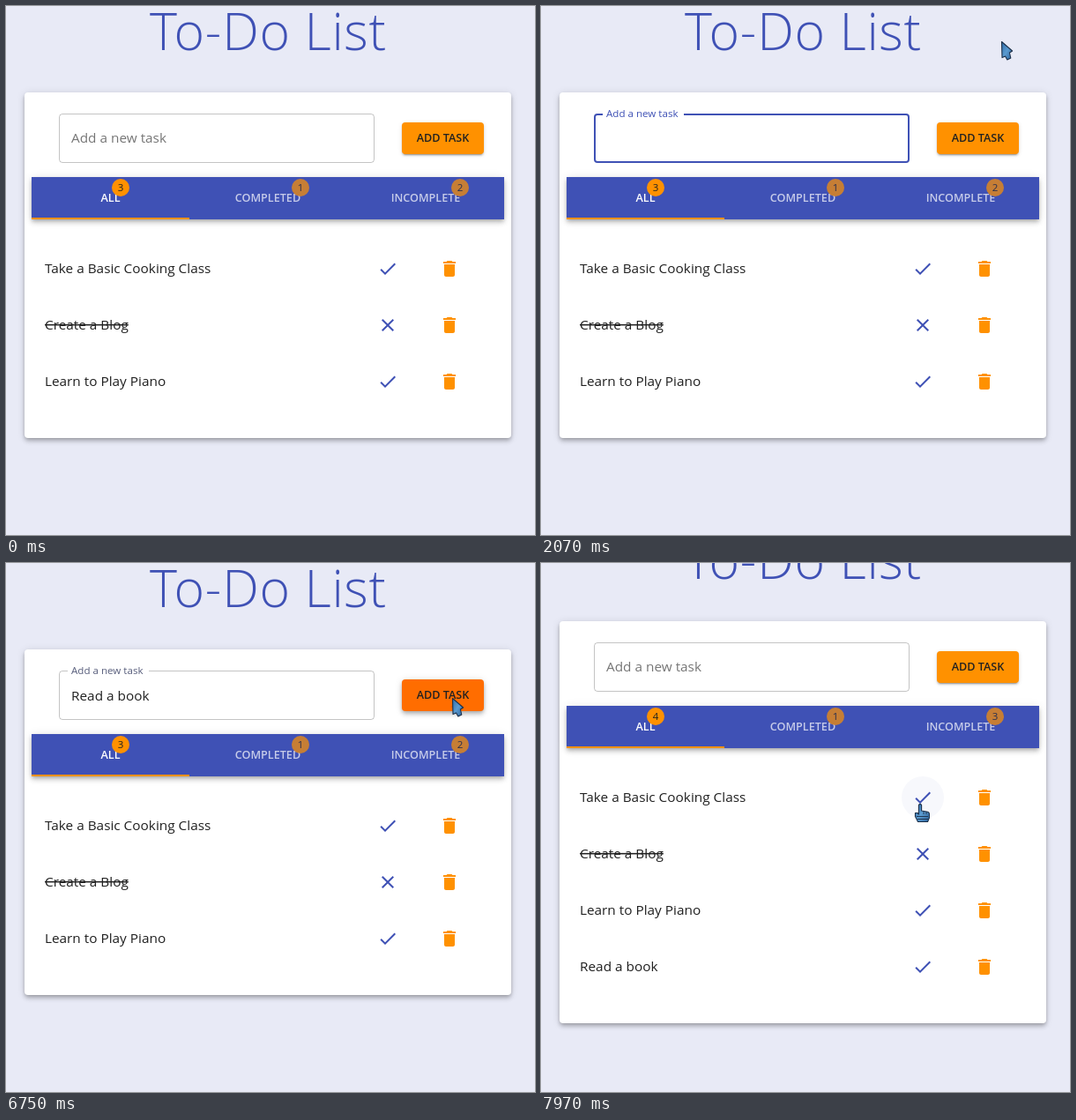
Animation of 600x600 px, one loop 8 s. Source, as an HTML page:

```html
<!DOCTYPE html>
<html lang="en">
<head>
<meta charset="utf-8">
<title>To-Do List</title>
<style>
  html, body { margin: 0; width: 100%; height: 100%; overflow: hidden; background: #e8eaf6; }
  #app { position: absolute; left: 0; top: 0; width: 600px; height: 600px; }
  #app div { position: absolute; box-sizing: border-box; border-radius: 4px; }
  svg { position: absolute; left: 0; top: 0; width: 600px; height: 600px; overflow: visible; }
  text { font: 15.35px "Open Sans", "Noto Sans", sans-serif; fill: #212121; white-space: pre; }
  #card { left: 21px; top: 98px; width: 552px; background: #fff;
    box-shadow: 0 2px 4px -1px #0003, 0 4px 5px #00000024, 0 1px 10px #0000001f; }
  #field { left: 60px; top: 122px; width: 358px; height: 56px; }
  #app #notch { left: 70px; top: 121px; height: 4px; background: #fff; border-radius: 0; }
  #button { left: 449px; top: 132px; width: 93px; height: 36px; }
  #app #bar { left: 29px; top: 194px; width: 536px; height: 48px; background: #3f51b5; border-radius: 0;
    box-shadow: 0 2px 4px -1px #0003, 0 4px 5px #00000024, 0 1px 10px #0000001f; }
  .title { font-size: 59px; font-weight: 300; letter-spacing: .6px; fill: #3f51b5; }
  .caps { font-size: 12.6px; font-weight: 600; text-anchor: middle; }
  .tab .caps { fill: #fff; }
  .tab .count { font-size: 11.5px; text-anchor: middle; }
  .done { text-decoration: line-through; }
</style>
</head>
<body>
<div id="app">
  <div id="card"></div>
  <div id="field"></div>
  <div id="notch"></div>
  <div id="button"></div>
  <div id="bar"></div>
  <svg>
    <defs><clipPath id="buttonClip"><rect x="449" y="132" width="93" height="36" rx="4"/></clipPath></defs>
    <text class="title" x="163" y="50">To-Do List</text>
    <text id="label">Add a new task</text>
    <text id="value" x="74" y="156"></text>
    <rect id="caret" y="141" width="1" height="19" fill="#212121"/>
    <circle id="ripple" cx="506" cy="163" clip-path="url(#buttonClip)"/>
    <text class="caps" x="495.5" y="154">ADD TASK</text>
    <rect x="29" y="240" width="179" height="2" fill="#ff9100"/>
    <g id="tabs"></g>
    <circle id="halo" cx="433" cy="298" r="24" fill="#3f51b5"/>
    <g id="rows"></g>
  </svg>
</div>
<svg>
  <defs>
    <linearGradient id="blue" x2="1" y2="1">
      <stop stop-color="#2f6ca8"/><stop offset=".5" stop-color="#5b9bd0"/><stop offset="1" stop-color="#2a5f98"/>
    </linearGradient>
  </defs>
  <g id="cursor" fill="url(#blue)" stroke="#1b2f49" stroke-width="1.1" stroke-linejoin="round">
    <path id="arrow" d="M.5.5L12.6 11 9.4 13 10.8 19 6.8 21 4.6 17 1 18.6Z"/>
    <path id="beam" d="M-3-8.5H3V-6H1.6V6H3V8.5H-3V6H-1.6V-6H-3Z"/>
    <g id="hand">
      <path d="M-1.6 1.5Q0-.8 1.6 1.5V8L8.5 9.2Q10.6 9.8 10.4 12V16L8.6 20.5H-2.5L-5.5 14.5V10.5H-3L-1.6 12Z"/>
      <path d="M-4 14.5H9M-3 17.5H9M4 8.5V12M7 9V12" fill="none" stroke-width=".9"/>
    </g>
  </g>
</svg>
<script>
const LOOP = 8000, FOCUS = 1560, PRESS = 6700, ADD = 6760;
const TASK = 'Read a book';
const KEY_TIMES = [3050, 3260, 3460, 3620, 3830, 4110, 4320, 4520, 4690, 4910, 5150];

// time, x, y of the pointer's hot spot
const POINTER = [
  [60, 507, 565], [200, 475, 502], [480, 342, 295], [720, 247, 149], [760, 247, 149],
  [850, 240, 138], [910, 235, 132], [1120, 235, 132], [1300, 240, 148], [1620, 240, 148],
  [1740, 365, 122], [1860, 470, 73], [1950, 470, 73], [2060, 522, 40], [5910, 522, 40],
  [6150, 540, 75], [6400, 520, 125], [6600, 506, 153], [7060, 506, 153],
  [7440, 466, 206], [7530, 466, 206], [7740, 440, 255], [7900, 430, 273]
];

const CHECK = 'M9 16.17L4.83 12l-1.42 1.41L9 19 21 7l-1.41-1.41z';
const CLOSE = 'M19 6.41L17.59 5 12 10.59 6.41 5 5 6.41 10.59 12 5 17.59 6.41 19 12 13.41 17.59 19 19 17.59 13.41 12z';
const TRASH = 'M6 19c0 1.1.9 2 2 2h8c1.1 0 2-.9 2-2V7H6v12zM19 4h-3.5l-1-1h-5l-1 1H5v2h14V4z';

const $ = id => document.getElementById(id);
const clamp = v => Math.max(0, Math.min(1, v));
const mix = (a, b, p) => a + (b - a) * p;
const show = (id, on) => $(id).style.display = on ? '' : 'none';
const set = (id, attrs) => Object.entries(attrs).forEach(([k, v]) => $(id).setAttribute(k, v));

function bezier(x1, y1, x2, y2) {
  const at = (a, b, s) => 3 * a * s * (1 - s) ** 2 + 3 * b * s * s * (1 - s) + s ** 3;
  return x => {
    let low = 0, high = 1;
    for (let i = 0; i < 20; i++) {
      const mid = (low + high) / 2;
      if (at(x1, x2, mid) < x) low = mid; else high = mid;
    }
    return at(y1, y2, low);
  };
}
const standard = bezier(.4, 0, .2, 1), decelerate = bezier(0, 0, .2, 1);
const ramp = (t, start, length, ease = standard) => ease(clamp((t - start) / length));

function pointerAt(t) {
  const next = POINTER.findIndex(p => p[0] > t);
  if (next < 0) return POINTER.at(-1).slice(1);
  const [t0, x0, y0] = POINTER[Math.max(0, next - 1)], [t1, x1, y1] = POINTER[next];
  const p = clamp((t - t0) / (t1 - t0 || 1));
  return [mix(x0, x1, p), mix(y0, y1, p)];
}

$('tabs').innerHTML = [['ALL', 118.5, 130], ['COMPLETED', 297, 334], ['INCOMPLETE', 476, 515]]
  .map(([name, x, badge], i) => `<g class="tab" opacity="${i ? .7 : 1}">
    <text class="caps" x="${x}" y="222">${name}</text>
    <circle cx="${badge}" cy="206" r="10" fill="#ff9100"/>
    <text class="count" x="${badge}" y="210"></text></g>`).join('');
const counts = document.querySelectorAll('.count');

$('rows').innerHTML = ['Take a Basic Cooking Class', 'Create a Blog', 'Learn to Play Piano', TASK]
  .map((name, i) => `<g id="row${i}" transform="translate(0 ${286 + 64 * i})">
    <text class="${i === 1 ? 'done' : ''}" x="44" y="17">${name}</text>
    <path d="${i === 1 ? CLOSE : CHECK}" transform="translate(421)" fill="#3f51b5"/>
    <path d="${TRASH}" transform="translate(491)" fill="#ff9100"/></g>`).join('');

function drawField(t, hovered) {
  const focused = t >= FOCUS && t < PRESS;
  $('field').style.border = focused ? '2px solid #3f51b5' : `1px solid rgba(0,0,0,${hovered ? .87 : .23})`;

  const shrink = ramp(t, FOCUS, 200, decelerate) - ramp(t, ADD, 200, decelerate);
  const tint = ramp(t, FOCUS, 200, decelerate) - ramp(t, PRESS, 200, decelerate);
  $('notch').style.width = 92 * shrink + 'px';
  set('label', { transform: `translate(74 ${mix(155, 126, shrink)}) scale(${mix(1, .755, shrink)})` });
  $('label').style.fill = `rgba(${63 * tint},${81 * tint},${181 * tint},${mix(.54, 1, tint)})`;

  const typed = KEY_TIMES.filter(k => k <= t).length;
  $('value').textContent = t < ADD ? TASK.slice(0, typed) : '';
  const awake = typed ? KEY_TIMES[typed - 1] : FOCUS;
  show('caret', focused && Math.floor((t - awake) / 505) % 2 === 0);
  set('caret', { x: typed ? Math.round(74 + $('value').getComputedTextLength()) : 74 });
}

function drawButton(t) {
  const hover = ramp(t, 6450, 250) - ramp(t, ADD, 250);
  const lift = 1 + hover;
  $('button').style.background = `rgb(255,${145 - 36 * hover},0)`;
  $('button').style.boxShadow =
    `0 ${4 - lift}px ${mix(1, 4, hover)}px ${lift - 3}px #0003, 0 ${2 * lift}px ${mix(2, 5, hover)}px #00000024, 0 1px ${5 * lift}px #0000001f`;
  const grow = ramp(t, PRESS, 550);
  set('ripple', { r: 66 * grow, opacity: t < PRESS ? 0 : .87 * mix(.1, .3, grow) * (1 - ramp(t, ADD, 550)) });
}

function drawPointer(t, x, y, inField) {
  const onTab = t > ADD && y > 162 && y < 210, onCheck = t > ADD && y > 246;
  const kind = onTab || onCheck ? 'hand' : inField ? 'beam' : 'arrow';
  for (const id of ['arrow', 'beam', 'hand']) show(id, id === kind);
  show('cursor', t >= 60);
  set('cursor', { transform: `translate(${Math.round(x)} ${Math.round(y)})` });
}

function draw(t) {
  const added = t >= ADD, [x, y] = pointerAt(t);
  const inField = t >= 60 && x > 60 && x < 418 && y > 122 && y < 178;
  $('app').style.transform = `translateY(${added ? -32 : 0}px)`;
  $('card').style.height = (added ? 456 : 392) + 'px';
  show('row3', added);
  [added ? 4 : 3, 1, added ? 3 : 2].forEach((n, i) => counts[i].textContent = n);
  set('halo', { opacity: .04 * ramp(t, 7700, 150) });
  drawField(t, inField);
  drawButton(t);
  drawPointer(t, x, y, inField);
}

const start = performance.now();
function tick() {
  draw((performance.now() - start) % LOOP);
  requestAnimationFrame(tick);
}
tick();
</script>
</body>
</html>
```
